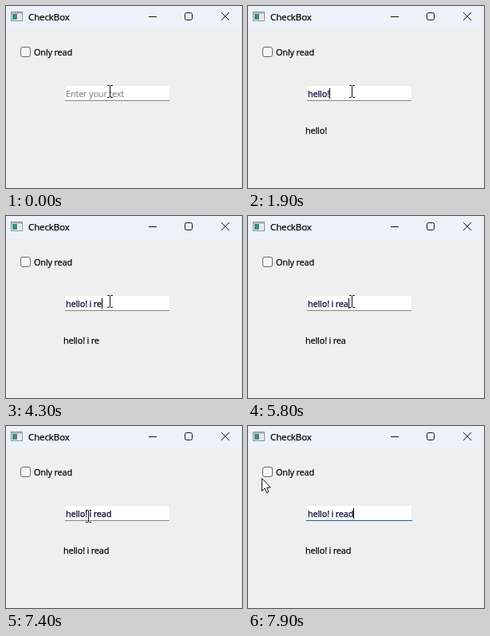
An HTML page for the animation above (8000 ms loop, 296x228 px).

```html
<!DOCTYPE html>
<html lang="en">
<head>
<meta charset="utf-8">
<title>CheckBox</title>
<style>
  html, body { margin: 0; width: 100%; height: 100%; overflow: hidden; background: #efefef; }
  svg { display: block; }
  text {
    font: 11px "Open Sans", "Noto Sans", sans-serif;
    letter-spacing: -.2px;
    white-space: pre;
    color: #000;
    fill: currentColor;
    stroke: currentColor;
    stroke-width: .25px;
  }
  .title { font-size: 11.5px; letter-spacing: -.1px; }
  .hint { color: #808080; stroke-width: .1px; }
  .typed { color: #000034; }
  .line { fill: none; stroke: #111; }
</style>
</head>
<body>
<svg width="296" height="228" viewBox="0 0 296 228">
  <rect width="296" height="228" fill="#efefef"/>
  <rect width="296" height="29" fill="#edf2fa"/>

  <g id="icon">
    <rect x="6.5" y="7.5" width="14" height="11" fill="#fafafa" stroke="#858d92"/>
    <rect x="7" y="8" width="13" height="2" fill="#b4bec3"/>
    <rect x="8" y="10" width="6" height="7" fill="#3f8a80"/>
    <rect x="15" y="11" width="4" height="6" fill="#e2e6e8"/>
  </g>
  <text class="title" x="28" y="17.5">CheckBox</text>
  <path class="line" d="M179 13.5h10"/>
  <rect class="line" x="224.5" y="8.5" width="9" height="9" rx="2"/>
  <path class="line" d="M270 8l10 10m0-10l-10 10"/>

  <rect x="18.5" y="51.5" width="12" height="12" rx="2.5" fill="#f6f6f6" stroke="#696969"/>
  <text x="35" y="62">Only read</text>

  <rect x="73" y="99" width="133" height="20" rx="2" fill="#eaeaea"/>
  <rect x="74" y="100" width="131" height="18" rx="1" fill="#fff"/>
  <rect id="underline" y="118" height="1"/>
  <text id="hint" class="hint" x="75" y="114">Enter your text</text>
  <text id="field" class="typed" x="75" y="114"></text>
  <rect id="caret" y="103" width="1" height="13" fill="#000"/>
  <text id="label" x="72" y="160"></text>

  <path id="beam" class="line" d="M-3 -7.5h2.5l1 1 1-1h2.5M.5 -7v14M-3 7.5h2.5l1-1 1 1h2.5"/>
  <path id="arrow" d="M.5 .6V16.4l3.6-3.5 2.6 5.8 2.3-1-2.4-5.6H11.2z" fill="#fff" stroke="#111" stroke-linejoin="round"/>
</svg>
<script>
const LOOP = 8000;
const STEP = 100;   // the screen is sampled this often
const BLINK = 600;

// Bursts of typing, one key per step; an empty one is a key without a letter
const bursts = [
  [100, "he"], [600, "l"], [1000, "lo"], [1800, "!"], [2200, ""], [3000, " "],
  [3700, "i "], [4200, "re"], [5300, "a"], [6300, "d"]
];

// The pointer leaves the field along one curve
const MOVE_START = 7100, MOVE_TIME = 800;
const pathX = [130, 138, 37, 17];
const pathY = [107, 115, 125, 65];

const $ = id => document.getElementById(id);
const [hint, field, label, caret, underline, beam, arrow] =
  ["hint", "field", "label", "caret", "underline", "beam", "arrow"].map($);

const show = (el, on) => el.setAttribute("visibility", on ? "visible" : "hidden");

function setText(el, text) {
  if (el.textContent !== text) el.textContent = text;
}

function bezier([a, b, c, d], p) {
  const q = 1 - p;
  return Math.round(a * q ** 3 + 3 * b * q * q * p + 3 * c * q * p * p + d * p ** 3);
}

function typedAt(t) {
  let text = "", lastKey = -BLINK;
  for (const [start, letters] of bursts) {
    if (t < start) break;
    const keys = Math.floor((t - start) / STEP) + 1;
    const part = letters.slice(0, keys);
    text += part;
    lastKey = start + STEP * Math.max(0, part.length - 1);
  }
  return { text, caretOn: Math.floor((t - lastKey) / BLINK) % 2 === 0 };
}

function drawText(t) {
  const { text, caretOn } = typedAt(t);
  setText(field, text);
  setText(label, text);
  show(hint, !text);
  show(caret, text && caretOn);
  caret.setAttribute("x", 75 + Math.round(field.getComputedTextLength()));
}

function drawPointer(t) {
  const p = Math.min(1, Math.max(0, (t - MOVE_START) / MOVE_TIME));
  const x = bezier(pathX, p), y = bezier(pathY, p);
  const hover = x >= 73 && x < 206 && y >= 99 && y < 119;
  show(beam, hover);
  show(arrow, !hover);
  (hover ? beam : arrow).setAttribute("transform", `translate(${x} ${y})`);

  // The focus line is blue only while the pointer is elsewhere
  underline.setAttribute("x", hover ? 74 : 73);
  underline.setAttribute("width", hover ? 131 : 133);
  underline.setAttribute("fill", hover ? "#868686" : "#1763a6");
}

const start = performance.now();
function tick() {
  const t = Math.floor(((performance.now() - start) % LOOP) / STEP) * STEP;
  drawText(t);
  drawPointer(t);
  requestAnimationFrame(tick);
}
tick();
</script>
</body>
</html>
```
